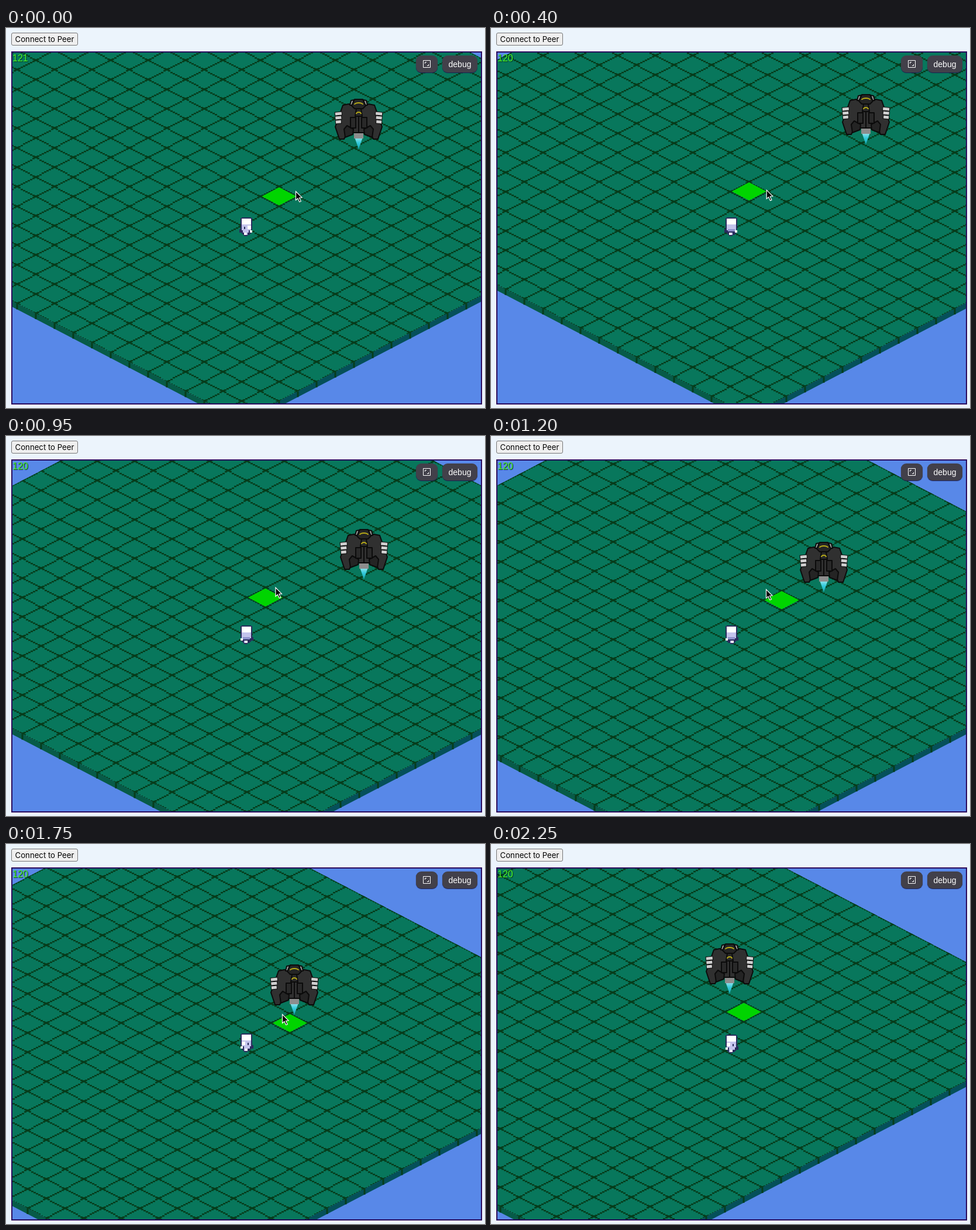
An HTML page with a canvas for the animation above (2300 ms loop, 819 px wide and 650 px high).

```html
<!DOCTYPE html>
<html lang="en">
<head>
<meta charset="utf-8">
<title>Isometric field</title>
<style>
html, body { margin: 0; width: 100%; height: 100%; overflow: hidden; background: #ecf4fc; }
body > * { position: absolute; box-sizing: border-box; }
canvas { left: 9px; top: 40px; border: 2px solid #2a0a5c; }
.btn { display: flex; align-items: center; justify-content: center; white-space: nowrap; }
#peer { left: 9px; top: 8px; width: 114px; height: 22px; border: 1px solid #767676; border-radius: 3px;
  background: #efefef; color: #000; font: 13.2px Inter, sans-serif; }
.dark { top: 47px; height: 29px; border-radius: 9px; background: #42404a; color: #fff;
  box-shadow: 0 1px 1px #1c1c50; font: 14px "Liberation Sans", sans-serif; }
#full { left: 701px; width: 37px; }
#debug { left: 746px; width: 60px; }
#fps { left: 11px; top: 42px; color: #4cf626; font: 16px/19px "Liberation Sans", sans-serif;
  text-shadow: 1px 1px 1px #032; }
</style>
</head>
<body>
<div id="peer" class="btn">Connect to Peer</div>
<canvas width="801" height="600"></canvas>
<div id="fps"></div>
<div id="full" class="btn dark"><svg width="13" height="13" fill="none" stroke="#fff">
  <path d="M.5 .5H12.5V12.5H.5ZM3.5 6V3.5H6M9.5 7V9.5H7"/></svg></div>
<div id="debug" class="btn dark">debug</div>
<script>
const LOOP = 2300, STEP = 50, SPEED = .17;
const SIDE = 25, HW = 32, HH = 50 / 3, WALL = 10;
const LINE = '#063d1c', NAVY = '#292b5c', LAV = '#c3c3ec';
const ctx = document.querySelector('canvas').getContext('2d');
const fps = document.querySelector('#fps');

// The world's drift around the player: [end time, x direction, y direction]
const legs = [[150, 1, 0], [325, 0, -1], [525, 1, 1], [650, 0, 1], [1500, -1, 1],
  [1525, -1, 0], [1630, 0, 0], [1830, -1, 0], [LOOP, -1, -1]];
// Pointer: [time, x, y]
const mouse = [[0, 495, 279], [200, 488, 294], [650, 449, 255], [1200, 470, 262], [1250, 488, 270],
  [1550, 464, 283], [1950, 480, 299], [2250, 458, 275]];

function drift(t) {
  let x = 603, y = 121, from = 0;
  for (const [end, dx, dy] of legs) {
    const d = (Math.min(t, end) - from) * SPEED;
    x += dx * d;
    y += dy * d / 2;
    if (t < end) return { x, y, dx, dy };
    from = end;
  }
}

function pointer(t) {
  const n = mouse.findIndex(m => m[0] > t);
  if (n < 0) return mouse[mouse.length - 1].slice(1);
  const [t0, x0, y0] = mouse[n - 1], [t1, x1, y1] = mouse[n], k = (t - t0) / (t1 - t0);
  return [x0 + (x1 - x0) * k, y0 + (y1 - y0) * k];
}

function poly(c, fill, pts, stroke) {
  c.beginPath();
  for (let i = 0; i < pts.length; i += 2) c.lineTo(pts[i], pts[i + 1]);
  c.closePath();
  c.fillStyle = fill;
  c.fill();
  if (stroke) { c.strokeStyle = stroke; c.stroke(); }
}

function box(c, fill, x, y, w, h) {
  c.fillStyle = fill;
  c.fillRect(x, y, w, h);
}

// The whole field, drawn once; its top corner is at (MID, 0)
const MID = SIDE * HW;
function makeField() {
  const cv = document.createElement('canvas');
  cv.width = MID * 2;
  cv.height = 2 * SIDE * HH + WALL + 1;
  const c = cv.getContext('2d'), mid = SIDE * HH, low = 2 * mid;
  const node = (i, j) => [MID + (i - j) * HW, (i + j) * HH];
  poly(c, '#075b48', [0, mid, MID, low, MID, low + WALL, 0, mid + WALL]);
  poly(c, '#05505a', [2 * MID, mid, MID, low, MID, low + WALL, 2 * MID, mid + WALL]);
  for (let i = 0; i <= SIDE; i++)
    for (const [x, y] of [node(SIDE, i), node(i, SIDE)]) box(c, LINE, x - 1.5, y, 3, WALL);
  poly(c, '#08775c', [MID, 0, 2 * MID, mid, MID, low, 0, mid]);
  c.clip();
  for (let i = 0; i <= SIDE; i++) {
    for (let k = 0; k <= SIDE * 8; k++) {
      const y = Math.round(i * HH + k * HH / 8) - 1;
      box(c, LINE, MID + i * HW - 4 * k - 2, y, 4, 2.5);
      box(c, LINE, MID - i * HW + 4 * k - 2, y, 4, 2.5);
    }
    for (let j = 0; j <= SIDE; j++) {
      const [x, y] = node(i, j);
      box(c, LINE, x - 4, Math.round(y) - 2, 8, 4);
    }
  }
  return cv;
}
const field = makeField();

function drawShip(x, y) {
  const dark = '#0b0b0b';
  ctx.save();
  ctx.translate(x, y);
  ctx.lineJoin = 'round';
  const glow = ctx.createLinearGradient(0, 64, 0, 86);
  glow.addColorStop(0, '#b5edf2');
  glow.addColorStop(.5, '#35cbdc');
  glow.addColorStop(1, '#14a4b0');
  poly(ctx, glow, [-7, 66, 7, 66, 0, 86]);
  box(ctx, '#8d8d8d', -8, 57, 16, 11);
  for (const s of [-1, 1]) {
    ctx.save();
    ctx.scale(s, 1);
    ctx.lineWidth = 2;
    poly(ctx, '#303030', [0, 12, 17, 9, 27, 11, 40, 48, 33, 69, 25, 69, 20, 58, 0, 58], dark);
    poly(ctx, '#242424', [9, 52, 20, 46, 25, 52, 23, 66, 10, 61], dark);
    box(ctx, '#292929', 5, 32, 9, 18);
    ctx.strokeRect(5, 32, 9, 18);
    poly(ctx, '#9b9b9b', [8, 2, 13, 3, 15, 11, 11, 11], dark);
    ctx.lineWidth = 1;
    for (let k = 0; k < 3; k++) {
      ctx.save();
      ctx.translate(29 + k / 2, 22 + k * 7);
      ctx.rotate(.1);
      box(ctx, '#cfcfcf', 0, 0, 12 - k, 6);
      ctx.strokeRect(0, 0, 12 - k, 6);
      ctx.restore();
    }
    ctx.restore();
  }
  ctx.lineWidth = 2;
  poly(ctx, '#252525', [-7, 1, 7, 1, 12, 12, 7, 17, -7, 17, -12, 12], dark);
  poly(ctx, '#292929', [-4, 17, 4, 17, 6, 30, -6, 30], dark);
  ctx.strokeStyle = '#b7aa18';
  for (const [cy, r] of [[9, 7], [25, 4]]) {
    ctx.beginPath();
    ctx.ellipse(0, cy + 1, r, 3, 0, Math.PI, 0);
    ctx.stroke();
  }
  ctx.restore();
}

function drawPlayer(dx, dy, n) {
  const swing = n % 2, bob = n % 4 === 1 ? 1 : 0;
  const px = (fill, x, y, w, h) => box(ctx, fill, x, y, w, h);
  ctx.save();
  ctx.translate(399, 324);
  ctx.scale(2, 2);
  ctx.translate(0, bob);
  if (dx < 0) { ctx.translate(12, 0); ctx.scale(-1, 1); }
  px(NAVY, 1, .5, 10, 10);
  px(NAVY, 2, 0, 8, 14);
  px('#fff', 2, 1, 8, 5);
  px(LAV, 2, 6, 8, 5);
  if (dy > 0) {
    px('#8f92cc', 3, 10, 6, 2);
  } else if (!dx) {
    px('#fff', 5, 8, 2, 2);
    px(LAV, 4, 11, 4, 2);
  } else {
    px('#fff', 7, 7, 3, 3);
    px(NAVY, 4, 8, 1, 2);
    px(LAV, 3, 11, 5, 2);
  }
  px(NAVY, 0, 10, 2, 3);
  px('#fff', 9, 11, 2, 2);
  px(NAVY, 3, 13, 6, 2);
  px('#fff', 4 + swing, 13, 2, 2);
  px(LAV, 6 + swing, 13, 1, 2);
  px(NAVY, 4 + swing, 15, 3, 1);
  ctx.restore();
}

function drawTile(ship, aim) {
  const bx = ship.x - 136, by = ship.y + 167;
  const u = (aim[0] - 8 - bx) / HW, v = (aim[1] + 11 - by) / HH;
  const a = Math.round((u + v) / 2), b = Math.round((v - u) / 2);
  const x = bx + (a - b) * HW, y = by + (a + b) * HH;
  poly(ctx, '#00d400', [x - 29.5, y, x, y - 15.5, x + 29.5, y, x, y + 15.5]);
}

function drawMouse(x, y) {
  ctx.save();
  ctx.translate(x + .5, y + .5);
  ctx.lineWidth = 1.2;
  poly(ctx, '#000', [0, 0, 0, 15, 3.4, 12, 6.3, 18, 8.8, 17, 6, 11, 10.5, 10.6], '#fff');
  ctx.restore();
}

function draw(now) {
  const n = Math.floor(now % LOOP / STEP), t = n * STEP, ship = drift(t);
  ctx.setTransform(1, 0, 0, 1, -11, -42);
  box(ctx, '#5888e8', 11, 42, 801, 600);
  ctx.drawImage(field, Math.round(ship.x - 200 - MID), Math.round(ship.y - 283));
  drawTile(ship, pointer(t + STEP));
  drawShip(Math.round(ship.x), Math.round(ship.y));
  drawPlayer(ship.dx, ship.dy, n);
  if (t < 2200) drawMouse(...pointer(t));

  // The frame rate sags once every 1300 ms
  const phase = t % 1300, sag = phase >= 500 && phase < 900 ? 6 + 2 * Math.floor(t / 1300) : 0;
  fps.textContent = 121 - Math.ceil(t / LOOP) - sag;
}

const start = performance.now();
function tick() {
  draw(performance.now() - start);
  requestAnimationFrame(tick);
}
tick();
</script>
</body>
</html>
```
